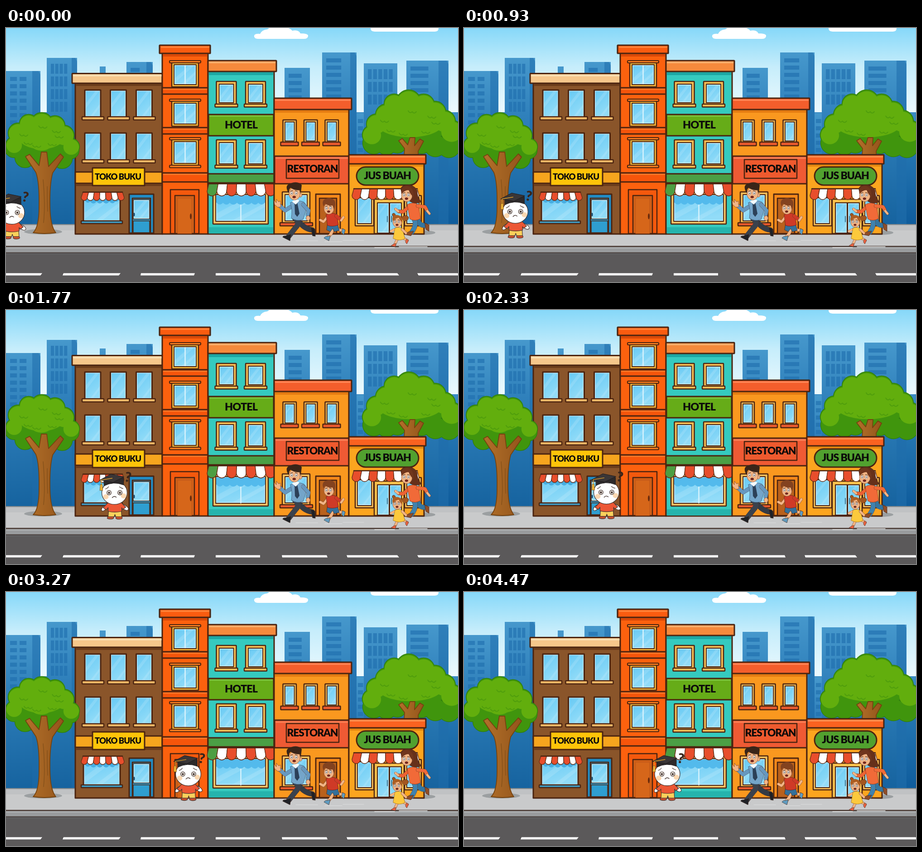
Write an HTML page that moves like this. It is 998x561 px and loops after 5010 ms.

```html
<!DOCTYPE html>
<html lang="id">
<head>
<meta charset="utf-8">
<title>Jalan kota</title>
<style>
html,body{margin:0;width:100%;height:100%;overflow:hidden;background:#bfe6f8}
svg{display:block;width:100vw;height:100vh}
text{font-family:Lato,Inter,sans-serif;font-weight:900;text-anchor:middle;fill:#0c0b0a}
</style>
</head>
<body>
<svg id="stage" viewBox="0 0 998 561">
<defs>
<linearGradient id="sky" x2="0" y2="1"><stop stop-color="#86d8f9"/><stop offset=".45" stop-color="#c6edfb"/><stop offset="1" stop-color="#eefafe"/></linearGradient>
<linearGradient id="haze" x2="0" y2="1"><stop stop-color="#3a8cc4"/><stop offset=".4" stop-color="#2273b0"/><stop offset="1" stop-color="#0f5c9c"/></linearGradient>
<linearGradient id="tower" x2="0" y2="1"><stop stop-color="#4698cc"/><stop offset=".35" stop-color="#2f80bb"/><stop offset="1" stop-color="#16639f"/></linearGradient>
<linearGradient id="glass" x2=".4" y2="1"><stop stop-color="#66c9f4"/><stop offset="1" stop-color="#92dcf8"/></linearGradient>
<linearGradient id="bark" x2="1" y2="0"><stop stop-color="#b2702a"/><stop offset="1" stop-color="#94551b"/></linearGradient>
</defs>
<g id="scene"></g>
<g id="hero"></g>
</svg>
<script>
const INK = '#4b2410', out = [];
const add = s => out.push(s);
const pen = (c, w) => w ? ` stroke="${c}" stroke-width="${w}" stroke-linejoin="round" stroke-linecap="round"` : '';

// box by its corners
const box = (x, y, x2, y2, fill, w = 0, r = 0, c = INK) =>
  add(`<rect x="${x}" y="${y}" width="${x2 - x}" height="${y2 - y}" rx="${r}" fill="${fill}"${pen(c, w)}/>`);
const path = (d, fill, w = 0, c = INK) => add(`<path d="${d}" fill="${fill}"${pen(c, w)}/>`);
const line = (d, c, w) => path(d, 'none', w, c);
const oval = (x, y, rx, ry, fill, w = 0, c = INK) =>
  add(`<ellipse cx="${x}" cy="${y}" rx="${rx}" ry="${ry}" fill="${fill}"${pen(c, w)}/>`);
const label = (s, x, y, size, gap) =>
  add(`<text x="${x}" y="${y}" font-size="${size}" letter-spacing="${gap}">${s}</text>`);

function pane(x, y, x2, y2, w = 2.5) {
  const a = x2 - x, b = Math.min(y2 - y, a * 1.3);
  box(x, y, x2, y2, 'url(#glass)');
  path(`M${x} ${y + b * .72}L${x + a * .72} ${y}H${x + a * .95}L${x} ${y + b * .95}Z`, '#fff2');
  path(`M${x + a * .3} ${y2}L${x2} ${y2 - b * .7}V${y2 - b * .55}L${x + a * .48} ${y2}Z`, '#fff2');
  box(x + 2, y + 2, x2 - 2, y2 - 2, 'none', 1.3, 0, '#c4ecfb');
  box(x, y, x2, y2, 'none', w);
}

function framed(x, y, x2, y2, trim, t = 5) {
  box(x, y, x2, y2, trim, 2.5, 1);
  pane(x + t, y + t, x2 - t, y2 - t, 1.8);
}

function awning(x, y, x2, y2, n, first = '#e84e2c') {
  const flare = 4, top = (x2 - x - 2 * flare) / n, low = (x2 - x) / n, r = low / 2;
  for (let i = 0; i < n; i++) {
    const a = x + i * low, b = a + low, u = x + flare + i * top, c = i % 2 ? '#fff' : i ? '#e84e2c' : first;
    path(`M${u} ${y}H${u + top}L${b} ${y2 - r}A${r} ${r} 0 0 1 ${a} ${y2 - r}Z`, c, 1.4, '#6a3018');
  }
  line(`M${x + flare} ${y}H${x2 - flare}`, INK, 2.5);
}

function skyline(x, top, x2, side, cols, rows, bars) {
  box(x, top, x2, 435, 'url(#tower)');
  if (side) path(`M${x2 - side} ${top}H${x2 - 4}L${x2} ${top + 8}V435H${x2 - side}Z`, '#1d6cab88');
  const w = (x2 - x - side - 16) / cols;
  for (let i = 0; i < cols; i++) for (let j = 0; j < rows; j++) {
    const h = bars ? 22 : 9, gap = bars ? 28 : 16, y = top + 13 + j * gap;
    box(x + 9 + i * w, y, x + 9 + (i + .72) * w, y + h, '#1f6eaea0');
  }
}

function crown(lobes, lit, core) {
  lobes.forEach(([x, y, r]) => oval(x, y, r, r, 'none', 2.4, '#2f7d0b'));
  const [cx, cy, rx, ry] = core;
  lobes.forEach(([x, y, r]) => oval(x, y, r, r, '#40950d'));
  oval(cx, cy, rx, ry, '#40950d');
  lobes.slice(0, lit).forEach(([x, y, r]) => oval(x, y + 1, r * .96, r * .94, '#62ae0d'));
  oval(cx, cy - ry * .15, rx * .9, ry * .8, '#62ae0d');
  for (let i = 0; i < 7; i++) {
    const a = i * 2.4, x = cx + Math.cos(a) * rx * .68, y = cy - 6 + Math.sin(a) * ry * .6;
    line(`M${x - 9} ${y}q4 7 9 2q4 6 9 0`, '#4f9d0d', 2);
  }
}

function backdrop() {
  box(0, 0, 998, 190, 'url(#sky)');
  path('M548 17Q549 12 561 13Q565 4 577 3Q588 -6 606 -4Q626 -2 632 6Q646 3 650 12Q668 12 667 18Q666 24 658 24H556Q547 23 548 17Z', '#fff');
  path('M805 0H955Q956 7 947 8H814Q804 7 805 0Z', '#fff');
  box(0, 186, 998, 435, 'url(#haze)');
  skyline(207, 85, 220, 0, 0, 0);
  skyline(0, 95, 76, 18, 2, 10);
  skyline(90, 66, 157, 12, 4, 4, true);
  skyline(266, 75, 324, 14, 1, 2);
  skyline(615, 88, 671, 0, 1, 5);
  skyline(752, 188, 800, 0, 2, 5);
  skyline(698, 54, 774, 14, 1, 8);
  skyline(790, 78, 864, 0, 5, 3, true);
  skyline(884, 72, 977, 22, 1, 7);
}

function street() {
  box(0, 433, 998, 484, '#c9cacb');
  box(0, 433, 998, 435.5, '#84898c');
  box(0, 435.5, 998, 447, '#c0c2c4');
  box(0, 481, 998, 484.5, '#574943');
  box(0, 484.5, 998, 496, '#999b9d');
  box(0, 484.5, 998, 487, '#afb2b4');
  box(0, 495.5, 998, 498.5, '#4a403d');
  box(0, 498.5, 998, 561, '#5b595a');
  [[0, 78, -2], [127, 251, -2], [298, 416, -1], [463, 561, 0], [609, 709, 1], [752, 866, 2], [908, 1000, 3]]
    .forEach(([a, b, k]) => path(`M${a} 541.5H${b - k}L${b + k} 546.5H${a + k}Z`, '#fff'));
}

function leftTree() {
  oval(82, 450, 42, 6, '#9b9fa1');
  crown([[50, 211, 20], [79, 211, 24], [108, 216, 22], [27, 232, 22], [128, 237, 22], [78, 238, 34],
    [18, 258, 18], [144, 262, 18], [18, 266, 20], [142, 270, 19], [42, 286, 22], [124, 288, 22], [68, 286, 22], [98, 286, 22]], 8, [78, 244, 58, 36]);
  path('M60 452Q73 440 73 395Q74 340 66 319L43 284L52 279L73 304L78 274H90L94 306L120 278L127 285L103 320Q96 345 97 395Q98 438 110 452Q85 456 60 452Z', 'url(#bark)', 1.8, '#74420f');
  line('M82 335Q87 390 83 430M91 350Q91 385 92 405', '#84501a', 1.4);
}

function rightTree() {
  oval(920, 452, 28, 5, '#9b9fa1');
  crown([[857, 168, 22], [889, 164, 27], [922, 170, 24], [840, 192, 24], [947, 186, 24], [968, 206, 24],
    [818, 212, 22], [984, 228, 24], [808, 236, 21], [812, 254, 24], [840, 258, 22], [864, 256, 20], [885, 246, 20],
    [918, 256, 21], [948, 260, 24], [978, 262, 24]], 9, [892, 214, 84, 42]);
  path('M878 300L880 266L867 249L875 244L887 258L892 242H903L902 260L914 245L922 250L910 272L911 300Z', 'url(#bark)', 1.8, '#74420f');
}

function bookshop() {
  box(153, 118, 345, 455, '#8a552a', 3);
  box(155, 122, 344, 128, '#6c3d1b');
  box(146, 100.5, 345, 122, '#f6c78b', 3, 1);
  box(148, 103, 344, 107, '#fbdcae');
  for (const y of [137, 232]) for (const x of [174, 230.5, 287.5]) {
    pane(x, y, x + 35, y + 60, 3);
    box(x - 6, y + 59, x + 42, y + 66, '#f5b967', 2.5, 1);
  }
  box(153, 318, 345, 343, '#f6a51e', 3);
  box(154, 344, 344, 349, '#6c3d1b');
  box(191, 309, 306, 348, '#ffc409', 3);
  label('TOKO BUKU', 247, 335, 18.5, -1);
  pane(171, 366, 252, 427, 3);
  path('M172 376q6 15 14 7q7 9 14 0q7 9 14 0q7 9 14 0q8 8 13 0q6 3 10 -7Z', '#47aee2');
  box(166, 426, 257, 432, '#3d9bc3', 2.5, 1);
  awning(166, 362.5, 261, 381, 7);
  box(272, 367, 326, 453, '#218cc4', 3);
  box(279, 376, 319, 453, '#319fd2', 2.5);
  pane(281, 379, 317, 422, 1.5);
  box(281, 426, 317, 452, '#2f9ed0', 1.5);
  oval(283, 412, 1.6, 4, '#164d72');
}

function towerHouse() {
  box(345, 55, 446, 455, '#fc610e', 3);
  box(347, 57, 444, 63, '#d94908');
  box(339, 38, 451, 56, '#fa5c10', 3.2, 1);
  box(342, 40.5, 449, 44, '#ff8237');
  for (const y of [132, 220, 320]) {
    box(345, y, 446, y + (y > 300 ? 20 : 14), '#f6550b', 2.8);
    box(347, y + 2, 444, y + 4.5, '#ff7b2b');
  }
  for (const [y, b] of [[72, 130], [157, 217], [242, 304]]) {
    framed(366, y + 4, 425, b, '#f5b73c', 5);
    line(`M395.5 ${y + 11}V${b - 7}`, '#d9f3fd', 2.5);
    box(361, y, 430, y + 5, '#f77a1d', 2.2, 2);
    if (b > 300) box(361, b - 1, 430, b + 4.5, '#f77a1d', 2.2, 2);
  }
  box(363, 357, 426, 454, '#f4590d', 2.5);
  box(373, 370, 416, 454, '#cf5f17', 2.5);
  box(379, 376, 410, 454, '#d6661a', .8, 0, '#b9531a');
  oval(408, 416, 2, 6.5, '#6a2b0c');
}

function hotel() {
  box(446, 95, 592, 455, '#35cabf', 3);
  box(448, 97, 590, 104, '#1ca7a3');
  box(446, 72, 597, 96, '#f58a3c', 3, 1);
  box(448, 74, 595, 78, '#fbad69');
  for (const [y, b] of [[118, 171], [247, 306]]) for (const x of [464.5, 529]) {
    framed(x, y, x + 44, b, '#f5bd55', 6);
    box(x - 3, b - 3, x + 47, b + 3.5, '#f5bd55', 2.4, 1);
  }
  box(447, 191, 591, 238, '#66ac18', 3);
  box(449, 193, 589, 196, '#7cc23c');
  label('HOTEL', 519, 221.5, 23.3, -.9);
  box(446, 322, 592, 342, '#4b9f45', 3);
  framed(457, 362, 579, 433, '#f5c367', 6);
  line('M518.5 372V426', '#d9f3fd', 2.5);
  path('M464 370V385q8 9 15 1q8 8 15 0q8 8 16 0q8 8 16 0q8 8 16 0q8 8 15 0q8 8 15 -1V370Z', '#53baec');
  box(448, 440, 590, 454, '#25b4ad');
  awning(444, 344, 595, 371, 7, '#4d9e42');
}

function restaurant() {
  box(592, 178, 757, 455, '#fa981f', 3);
  box(594, 181, 755, 187, '#e57c12');
  box(592, 155, 763, 180, '#f45e2c', 3, 1);
  box(594, 157.5, 761, 161, '#ff8454');
  for (const x of [611.5, 658, 704.5]) {
    framed(x, 203, x + 29.5, 254, '#f6bd58', 4.5);
    box(x - 5, 252, x + 34, 260, '#e8592d', 2.4, 1);
  }
  box(593, 283, 757, 344, '#ef5a34', 3);
  box(595, 285.5, 755, 289, '#f97d54');
  box(619, 290.5, 735, 332, '#ee5a2e', 2.6);
  label('RESTORAN', 676.5, 318.5, 22.6, -1.1);
  framed(610, 362, 671, 432, '#f6bd58', 6);
  box(605, 430, 677, 437, '#e8592d', 2.5, 1);
  box(684, 367, 738, 454, '#f5881a', 2.8);
  box(692, 376, 730, 454, '#b9611d', 2.5);
  oval(724, 416, 2, 4, '#57260e');
}

function juiceBar() {
  box(757, 298, 923, 455, '#fca51f', 3);
  box(759, 301, 921, 306, '#e5860f');
  box(757, 280, 927, 300, '#fa6220', 3, 1);
  box(759, 282.5, 925, 286, '#ff8d4e');
  box(774, 307, 911, 347, '#51a12f', 3, 20);
  label('JUS BUAH', 842, 333.5, 23, -1);
  framed(771, 370, 812, 437, '#f6bd58', 5);
  framed(880, 370, 917, 437, '#f6bd58', 5);
  box(813, 378, 879, 454, '#f9c14d', 2.5);
  pane(820, 386, 846, 453, 2);
  pane(847, 386, 873, 453, 2);
  line('M842 416V428M851 416V428', '#39718d', 2);
  awning(764, 355, 912, 379, 8);
}

const SKIN = '#f3b585', DARK = '#3b241b', EDGE = '#7a4630';

// limb: thin outline below a coloured stroke
function limb(d, c, w) {
  line(d, '#5d3627', w + .8);
  line(d, c, w);
}

function face(x, y, r) {
  oval(x, y, r, r * 1.12, SKIN, .7, EDGE);
  for (const s of [-1, 1]) {
    const ex = x - r * .1 + s * r * .4;
    oval(ex, y - r * .1, r * .25, r * .28, '#fff', .5, DARK);
    oval(ex, y - r * .08, r * .09, r * .11, DARK);
    line(`M${ex - r * .2} ${y - r * .5 - s * r * .06}l${r * .4} ${s * r * .12}`, DARK, 1);
  }
  oval(x - r * .06, y + r * .58, r * .28, r * .2, '#7c231c', .5, DARK);
}

function family() {
  line('M640 470H688M704 472H742M744 469H790', '#dedfdf', 1.2);
  line('M814 485H858M868 483H930', '#eceded', 1.5);

  // father
  limb('M642 420Q655 443 676 446', '#343b45', 11);
  path('M674 441L682 444L683 460L677 459Z', '#1f2126', .7, DARK);
  limb('M638 421Q650 430 640 440L625 459', '#3a424d', 11);
  path('M629 456L627 470L611 462Q611 459 617 459Z', '#1f2126', .7, DARK);
  limb('M634 392L616 403L604 392', '#6698c0', 8);
  path('M607 395L600 396L593 390L592 381L597 386L597 378L602 384L606 382L606 389Z', SKIN, .8, EDGE);
  path('M628 386Q642 378 657 384Q668 393 661 407L656 423Q642 428 630 420Q633 402 628 386Z', '#74a5ca', .8, '#3c5c76');
  limb('M656 390L668 403L666 413', '#6698c0', 8);
  oval(667, 420, 4.5, 5.5, SKIN, .8, EDGE);
  path('M637 385L643 385L648 410L643 417L638 411Z', '#2c4058');
  path('M631 383L640 390L648 381L640 378Z', '#f4fafd');
  oval(650, 369, 3.5, 4.5, SKIN, .8, EDGE);
  face(637, 366, 12.5);
  path('M623 363Q615 348 626 344Q644 336 653 347L651 364L648 358Q636 359 629 353Q624 355 625 364Z', '#3a2519');

  // son
  limb('M728 438Q732 448 744 447', SKIN, 6);
  limb('M718 440Q724 450 712 461', SKIN, 6);
  path('M743 443L749 446L746 457L741 452Z', '#5f9bc0', .7, DARK);
  path('M716 459L713 470L702 464Q704 460 711 460Z', '#5f9bc0', .7, DARK);
  path('M710 433L732 433L736 447L725 450L721 443L716 450L708 446Z', '#35709a', .7, DARK);
  limb('M710 417L701 428L694 424', SKIN, 5);
  path('M707 412Q720 406 730 412L734 435Q720 440 710 436Z', '#cf3a27', .8, '#6b1d18');
  limb('M729 415L739 423', '#cf3a27', 7);
  limb('M740 425L745 418', SKIN, 5);
  face(713, 399, 11);
  path('M701 394Q696 381 706 377Q718 372 726 382Q729 390 724 401L721 392Q710 393 705 388Z', '#83421f');

  // mother
  path('M874 364Q867 350 882 347Q900 344 908 359Q907 372 917 384Q904 391 892 383Z', '#66301a', .7, DARK);
  limb('M910 424Q912 437 926 436', '#35759f', 10);
  limb('M901 422Q908 434 896 451', '#3f82ae', 10);
  path('M925 431L934 435L934 449L927 445Z', '#8f4d28', .7, DARK);
  path('M900 449L894 459L880 456L889 450Z', '#8f4d28', .7, DARK);
  limb('M888 396L877 406L867 405', '#ee6232', 7);
  limb('M866 405L860 400', SKIN, 5);
  path('M886 390Q899 383 911 390L915 421Q903 428 892 422Z', '#f16a38', .8, '#8d3a1c');
  limb('M909 393L925 395L929 402', '#f16a38', 7);
  limb('M930 404L935 410', SKIN, 5);
  face(885, 370, 12);
  path('M873 367Q870 350 885 349Q901 350 900 374Q893 368 889 358Q880 358 873 367Z', '#70361d');

  // daughter
  path('M873 418Q884 410 889 418Q889 426 879 427Z', '#a3561f', .7, DARK);
  path('M855 417Q850 410 856 409Q861 410 860 416Z', '#a3561f', .7, DARK);
  limb('M875 463L886 469', SKIN, 5);
  limb('M865 464L859 477', SKIN, 5);
  path('M884 466L889 469L885 477L882 473Z', '#e9603f', .6, DARK);
  path('M861 476L860 483L850 481L856 477Z', '#e9603f', .6, DARK);
  limb('M860 444L850 449', SKIN, 5);
  path('M859 442Q868 438 875 443L881 465Q869 472 855 465Z', '#fcc93c', .8, '#a06d1d');
  limb('M875 445L883 453', SKIN, 5);
  face(864, 429, 10);
  path('M854 427Q850 414 863 413Q877 414 875 430Q870 425 867 419Q860 420 854 427Z', '#ad5e22');
}

// origin is the middle of the head
function wanderer() {
  const edge = '#453530';
  path('M-19 28Q-29 33 -29 40Q-25 44 -20 38ZM20 27Q31 32 31 38Q27 43 20 37Z', '#fff', 1.2, edge);
  path('M-13 40H15L16 55H3L1 49L-1 55H-14Z', '#fbd05b', 1.2, edge);
  path('M-15 54H-2V58Q-8 61 -16 58ZM3 54H16Q19 58 15 59Q8 61 3 58Z', '#c9502f', 1.1, edge);
  path('M-14 23Q0 19 15 23L25 33L18 38L16 34V42Q0 46 -14 42V34L-18 39L-25 34Z', '#ec5735', 1.2, edge);
  oval(0, 1, 28, 26, '#fff', 1.3, edge);
  oval(-19, 10, 6, 5.5, '#fbd8b1');
  oval(20, 8, 6, 5.5, '#fbd8b1');
  for (const x of [-12, 12]) {
    oval(x, 1, 4.8, 5, '#e9e4de', 1.2, edge);
    oval(x, 1.3, 2.2, 2.4, edge);
  }
  line('M-20 -7Q-16 -8 -13 -12M11 -12Q15 -9 19 -8', edge, 1.2);
  line('M-5 12Q-1 7 4 11', edge, 1.4);
  path('M-23 -26L20 -32L20 -16Q-2 -25 -23 -14Z', '#2c292a', 1, '#1f1c1d');
  path('M-32 -27L-8 -40L21 -34L-3 -22Z', '#3a3637', 1, '#1f1c1d');
  line('M-5 -31L-29 -27V-16', '#dfa02c', 1.4);
  path('M-31 -17H-27L-26 -4H-32Z', '#eeb437', .8, '#7c5518');
  add('<text x="0" y="0" font-size="30" transform="translate(28 -23) rotate(10)" style="fill:#38241a">?</text>');
}

function flush(id) {
  document.getElementById(id).innerHTML = out.join('');
  out.length = 0;
}

[backdrop, street, rightTree, bookshop, towerHouse, hotel, restaurant, juiceBar, leftTree, family].forEach(f => f());
flush('scene');
wanderer();
flush('hero');

const LOOP = 5010, LAST = 134;
const walk = [[0, 13], [530, 85], [930, 113], [1070, 126], [1600, 211], [1770, 240], [2130, 287], [2330, 314],
  [2670, 352], [3200, 398], [3730, 425.5], [4270, 443], [4470, 449]];

const slope = i => {
  const a = walk[Math.max(0, i - 1)], b = walk[Math.min(walk.length - 1, i + 1)];
  return (b[1] - a[1]) / (b[0] - a[0]);
};

// smooth curve through the walk points
function walkX(t) {
  let i = 0;
  while (i < walk.length - 2 && t > walk[i + 1][0]) i++;
  const [t0, x0] = walk[i], [t1, x1] = walk[i + 1], h = t1 - t0, u = Math.min(1, (t - t0) / h), v = 1 - u;
  return v * v * (1 + 2 * u) * x0 + u * u * (3 - 2 * u) * x1 + h * u * v * (v * slope(i) - u * slope(i + 1));
}

const hero = document.getElementById('hero');

function draw(ms) {
  const step = Math.min(LAST, Math.floor((ms % LOOP + 5) * .03));
  const x = walkX(step / .03), left = Math.max(0, (449 - x) / 436);
  const y = 401 + 5.5 * left ** 1.8;
  hero.setAttribute('transform', `translate(${x.toFixed(2)} ${y.toFixed(2)})`);
}

const start = performance.now();
function tick() {
  draw(performance.now() - start);
  requestAnimationFrame(tick);
}
tick();
</script>
</body>
</html>
```
